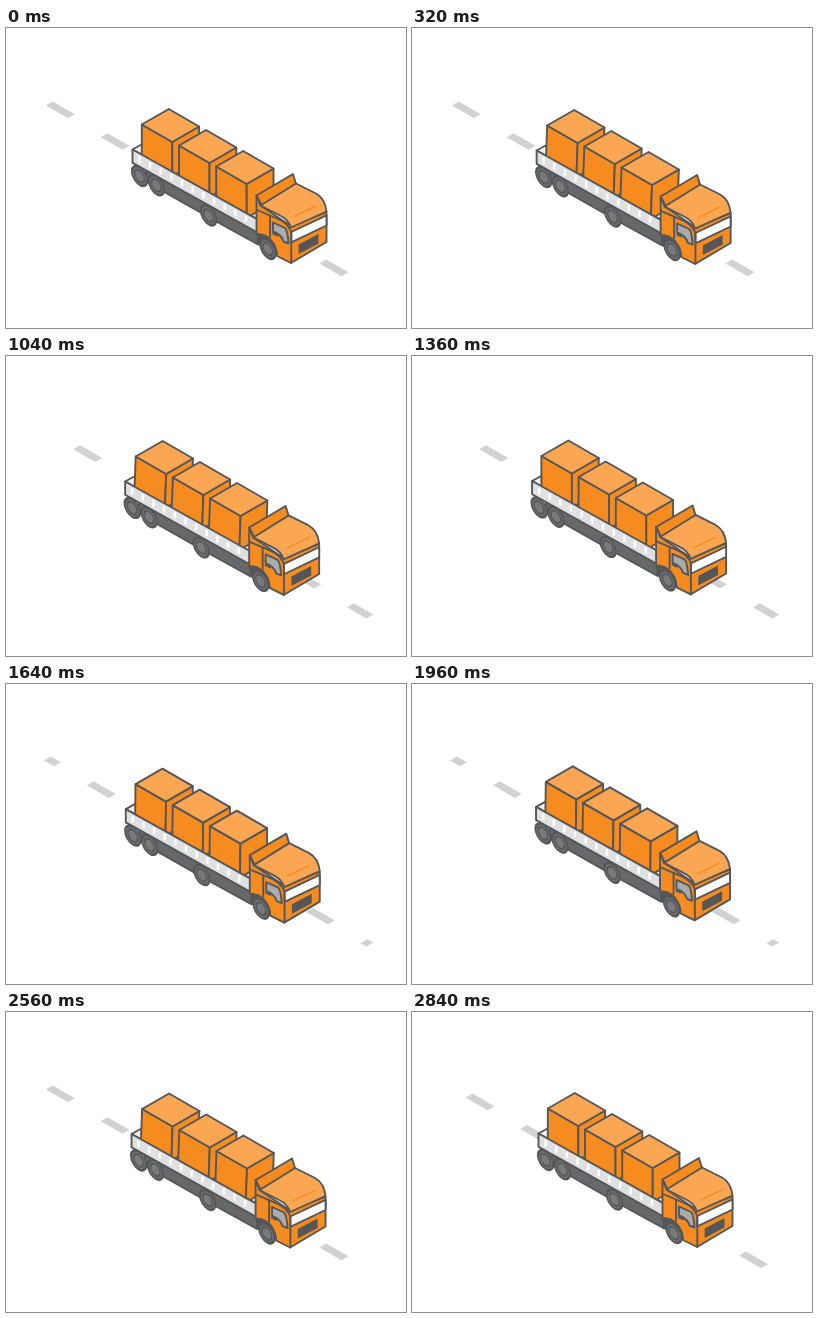
An HTML page for the animation above (2.88 s loop, 400 by 300 pixels).

```html
<!DOCTYPE html>
<html lang="en">
<head>
<meta charset="utf-8">
<title>Truck on the road</title>
<style>
  html, body { margin: 0; width: 100%; height: 100%; overflow: hidden; background: #fff; }
  svg { display: block; width: 100%; height: 100%; }
  .line { stroke: #545658; stroke-width: 1.9; stroke-linejoin: round; stroke-linecap: round; }
  .main { fill: #f68b1f; }
  .light { fill: #faa653; }
  .white { fill: #fff; }
  .dark { fill: #545658; }
  .none { fill: none; }
</style>
</head>
<body>
<svg viewBox="0 0 400 300">
  <defs>
    <g id="wheel" class="line">
      <circle r="9" fill="#6b6d6f"/>
      <circle r="5.6" fill="#77797b" stroke-width="1.5"/>
    </g>
  </defs>

  <!-- isometric axes: x runs along the road, y across it -->
  <g transform="matrix(.866 .5 .866 -.5 41.3 74.4)">
    <path id="road" d="M0 0H372.4" fill="none" stroke="#d1d2d4" stroke-width="8" stroke-dasharray="25.4 37.8"/>
  </g>

  <g id="truck">
    <path class="line" fill="#66686a" d="M140 140L252 203V216.5L213 195L160 165L140 153Z"/>
    <path class="line" fill="#f1f1f2" d="M126.5 121.5L135.5 116.5L262 187L252 191.5Z"/>
    <g id="boxes"></g>
    <path class="line" fill="#dfe0e1" d="M126.5 121.5L251.5 191.3V204.5L126.5 134.8Z"/>
    <path id="ribs" fill="none" stroke="#fff" stroke-width="2.4"/>
    <g id="wheels"></g>

    <!-- cab: deflector, body, roof, visor -->
    <path class="line main" d="M250.5 167.5L287 146L290 156L256 178Z"/>
    <path class="line main" d="M250.5 167.5L254.5 177.5L285 198L320.5 184V214L285 235L271 228C271 216 262 207 250.5 206.5Z"/>
    <path class="line light" d="M254.5 177.5L290 155.5L310 165.5Q319 170.5 320.5 183.5L285 199.5Q282.5 191.5 274 187.5Z"/>
    <path class="line none" d="M251 182L271 190.5Q282 195 285.3 204"/>
    <path d="M288 188.3L310.5 177.5" stroke="#f68b1f" stroke-width="1.4"/>
    <path class="line white" d="M285.3 204L320.5 187.3V197.5L285.3 214.3Z"/>
    <path class="line none" d="M285.3 204V235M264 188V209"/>
    <path class="line" fill="#a9abae" d="M267 194.5L279 200Q281.5 202 282.5 215.5L277.5 213.5Q275.5 206.5 267 203.5Z"/>
    <path class="line none" d="M267 205.3L271 207.3"/>
    <path class="dark" d="M292.7 216.5L312.5 206V215.5L292.7 226Z"/>
    <path class="dark" d="M251 205C262 205 271 213 272 229L262 224L251 216Z"/>
    <use href="#wheel" transform="matrix(.866 .5 0 1 261.8 221)"/>
  </g>
</svg>
<script>
const LOOP = 2880, STEP = 40, SWAY = 720;
const $ = id => document.getElementById(id);
const NS = 'http://www.w3.org/2000/svg';

function add(parent, tag, attrs) {
  const el = document.createElementNS(NS, tag);
  for (const key in attrs) el.setAttribute(key, attrs[key]);
  return parent.appendChild(el);
}

for (const [x, y] of [[133.5, 148], [150.3, 157.3], [202.5, 187.5]])
  add($('wheels'), 'use', { href: '#wheel', transform: `matrix(.866 .5 0 1 ${x} ${y})` });

$('ribs').setAttribute('d', Array.from({ length: 11 }, (_, i) =>
  `M${133.5 + i * 10.65} ${128.3 + i * 5.94}v6.4`).join(''));

const boxes = [0, 1, 2].map(i => ({
  x: 162.8 + i * 37.2,
  y: 81 + i * 21,
  faces: ['line main', 'line main', 'line light'].map(c => add($('boxes'), 'path', { class: c }))
}));

// lean moves the lid sideways while the base stays put
function drawBox({ x, y, faces }, lean) {
  const point = (dx, dy, low) => `${x + dx + (low ? 0 : lean)} ${y + dy + (low ? 34 : 0)}`;
  const left = [-27, 15.5], front = [3.5, 33], right = [30.3, 17.5];
  const side = (a, b) =>
    `M${point(...a)}L${point(...b)}L${point(...b, true)}L${point(...a, true)}Z`;
  faces[0].setAttribute('d', side(left, front));
  faces[1].setAttribute('d', side(front, right));
  faces[2].setAttribute('d',
    `M${point(0, 0)}L${point(...right)}L${point(...front)}L${point(...left)}Z`);
}

function smooth(t, from, to) {
  const k = Math.min(1, Math.max(0, (t - from) / (to - from)));
  return k * k * (3 - 2 * k);
}

function draw(ms) {
  const t = Math.floor(ms % LOOP / STEP) * STEP;
  const drift = smooth(t, 200, 700) - smooth(t, 1640, 2160);
  const sway = Math.sin(Math.PI * t / SWAY) ** 4;
  const shift = 6.4 * drift + sway;

  $('road').setAttribute('stroke-dashoffset', 63.2 * (t % 160) / 160 - 2.3);
  $('truck').setAttribute('transform', `translate(${-shift} ${shift * 0.54})`);
  boxes.forEach(box => drawBox(box, 1.3 * sway));
}

const start = performance.now();
function tick() {
  draw(performance.now() - start);
  requestAnimationFrame(tick);
}
tick();
</script>
</body>
</html>
```
